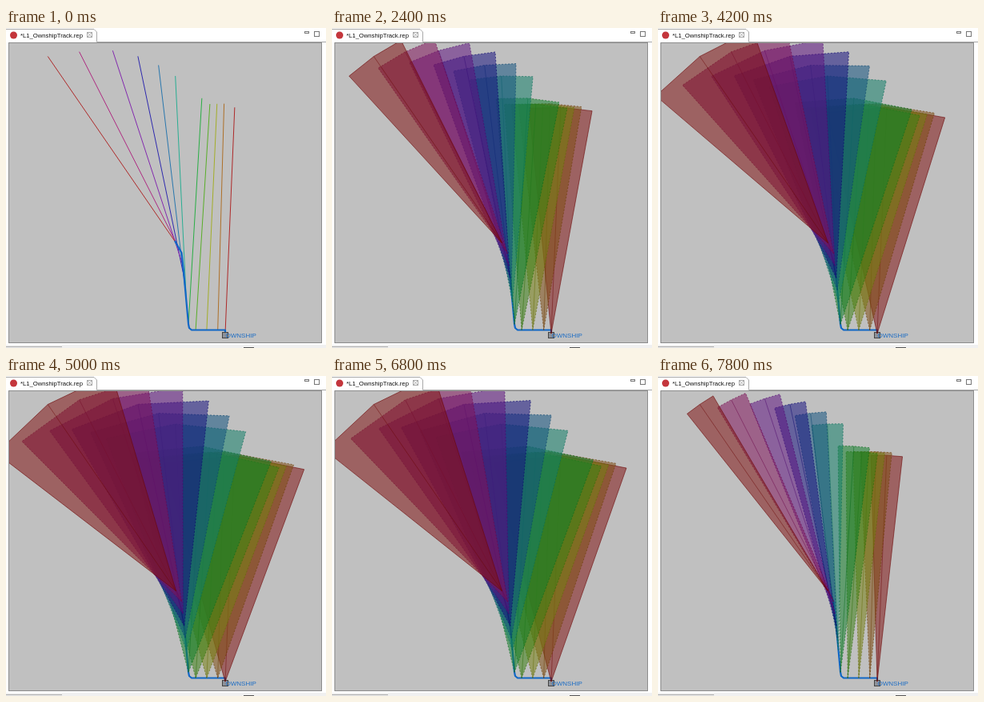
Write an HTML page with a canvas that moves like this. It is 400 by 400 pixels and loops after 8 s.

```html
<!DOCTYPE html>
<html lang="en">
<head>
<meta charset="utf-8">
<title>Bearing uncertainty</title>
<style>
html, body { margin: 0; width: 100%; height: 100%; overflow: hidden; background: #fff; }
canvas { display: block; }
</style>
</head>
<body>
<canvas id="stage" width="400" height="400"></canvas>
<script>
const ctx = document.getElementById('stage').getContext('2d');
const LOOP = 8000, TICK = 200, RANGE = 283;

const track = [[274, 382], [274, 377.5], [232, 377.5], [229, 375],
  [228, 370], [222, 304], [219.5, 281], [211, 266]];

// Degrees from north of each sensor cut, in order along the track.
const bearings = [2.4, 1.6, 2.6, 3.6, 3.4, -2.8, -6.8, -11.8, -18.1, -26.9, -34.5];

// Ticks at which the widening pauses.
const rests = [4, 9, 13, 18, 22, 28];

function pointAlong(points, distance) {
  for (let i = 1; i < points.length; i++) {
    const [x, y] = points[i - 1];
    const dx = points[i][0] - x, dy = points[i][1] - y;
    const length = Math.hypot(dx, dy);
    if (distance <= length) return [x + dx * distance / length, y + dy * distance / length];
    distance -= length;
  }
  return points.at(-1);
}

// Cuts are evenly spaced on each leg; the second leg is slightly faster.
const sensors = bearings.map((bearing, i) => ({
  bearing,
  origin: pointAlong(track, i < 5 ? 13.8 * i : 83 + 15.2 * (i - 5)),
  hue: 36 * i - 12 * Math.sin(Math.PI * i / 10),
}));

function halfWidth(t) {
  const tick = Math.floor(t / TICK);
  const rise = tick - 2 - rests.filter(rest => rest <= tick).length;
  const fall = 22 - 2.6 * (tick - 32);
  return Math.round(Math.max(0, Math.min(rise, 22, fall)));
}

function rect(x, y, w, h, color) {
  ctx.fillStyle = color;
  ctx.fillRect(x, y, w, h);
}

function frame(x, y, w, h, color) {
  ctx.strokeStyle = color;
  ctx.lineWidth = 1;
  ctx.strokeRect(x, y, w, h);
}

function path(points) {
  ctx.beginPath();
  points.forEach(([x, y]) => ctx.lineTo(x, y));
}

function line(points, color, width = 1) {
  path(points);
  ctx.strokeStyle = color;
  ctx.lineWidth = width;
  ctx.stroke();
}

function label(text, x, y, size, color) {
  ctx.font = `${size}px "Liberation Sans", sans-serif`;
  ctx.fillStyle = color;
  ctx.fillText(text, x, y);
}

function drawWindow() {
  rect(0, 0, 400, 400, '#fff');
  line([[0, 1.5], [110, 1.5], [113.5, 5], [113.5, 17.5], [400, 17.5]], '#a8a8a8');
  ctx.fillStyle = '#c4363c';
  ctx.beginPath();
  ctx.arc(9.5, 9, 4.5, 0, 7);
  ctx.fill();
  label('*L1_OwnshipTrack.rep', 18, 12, 7.7, '#111');

  frame(101.5, 5.5, 6, 6, '#aaa');
  line([[102, 6], [107, 11]], '#aaa');
  line([[107, 6], [102, 11]], '#aaa');
  frame(373.5, 4.5, 5, 2, '#777');
  frame(385.5, 4.5, 6, 6, '#777');

  rect(3, 18, 392, 376, '#c0c0c0');
  frame(3.5, 18.5, 391, 375, '#8c8c8c');
  rect(0, 396, 400, 4, '#f0f0f0');
  line([[0, 398.5], [70, 398.5]], '#aaa');
  rect(297, 399, 13, 1, '#555');
}

function drawShip() {
  ctx.lineJoin = 'round';
  line(track, '#1167c6', 2.2);
  ctx.lineJoin = 'miter';
  rect(270, 380, 8, 8, '#8d9199');
  frame(270.5, 380.5, 7, 7, '#444');
  label('OWNSHIP', 274.5, 387, 8, '#1b6cc4');
}

function drawSensor({ bearing, origin, hue }, half) {
  const tip = offset => {
    const angle = (bearing + offset) * Math.PI / 180;
    return [origin[0] + RANGE * Math.sin(angle), origin[1] - RANGE * Math.cos(angle)];
  };
  const axis = [origin, tip(0)];
  if (!half) return line(axis, `hsl(${hue} 62% 42%)`);

  const edge = `hsl(${hue} 90% 22% / .6)`;
  path([origin, tip(-half), tip(0), tip(half)]);
  ctx.closePath();
  ctx.fillStyle = `hsl(${hue} 73% 29% / .54)`;
  ctx.fill();
  ctx.strokeStyle = edge;
  ctx.lineWidth = 1;
  ctx.setLineDash(hue % 360 ? [2, 2] : []);
  ctx.stroke();
  ctx.setLineDash([]);
  line(axis, edge, 0.8);
}

function draw(t) {
  const half = halfWidth(t);
  drawWindow();
  ctx.save();
  ctx.beginPath();
  ctx.rect(4, 19, 390, 374);
  ctx.clip();
  if (half) drawShip();
  sensors.forEach(sensor => drawSensor(sensor, half));
  if (!half) drawShip();
  ctx.restore();
}

const begin = performance.now();
function tick() {
  draw((performance.now() - begin) % LOOP);
  requestAnimationFrame(tick);
}
tick();
</script>
</body>
</html>
```
